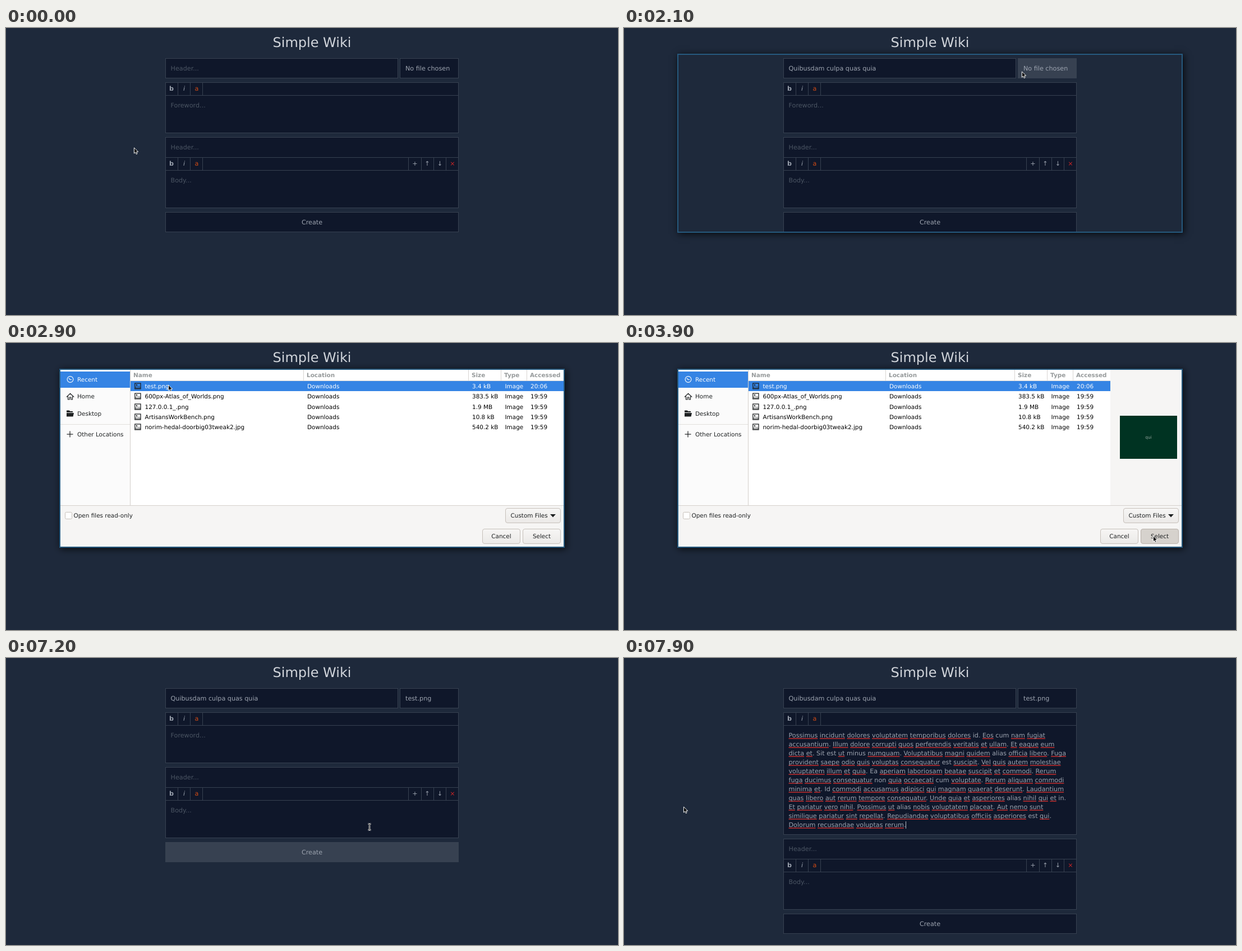
An HTML page with a canvas for the animation above (8 s loop, 1091 by 513 pixels).

```html
<!DOCTYPE html>
<html lang="en">
<head>
<meta charset="utf-8">
<title>Simple Wiki</title>
<style>
html, body { margin: 0; width: 100%; height: 100%; overflow: hidden; background: #1e293b; }
canvas { display: block; width: 1091px; height: 513px; }
</style>
</head>
<body>
<canvas id="stage"></canvas>
<script>
const W = 1091, H = 513, LOOP = 8000, STEP = 100;
const canvas = document.getElementById('stage');
const ratio = window.devicePixelRatio || 1;
canvas.width = W * ratio;
canvas.height = H * ratio;
const ctx = canvas.getContext('2d');
ctx.scale(ratio, ratio);
ctx.textRendering = 'geometricPrecision';

const FONT = '"DejaVu Sans", sans-serif';
const PAGE = '#1e293b', FIELD = '#0f172a', LINE = '#374151';
const TEXT = '#9ca3af', HINT = '#4b5563';
const INK = '#1e2122', EDGE = '#c6c0ba', PANEL = '#f6f5f4', BLUE = '#3584e4';
const WEB = 11.2, GTK = 10.45;
const LEFT = 284, RIGHT = 807, PAD = 293.5;
const GROWTH = 128;

const TITLE = 'Quibusdam culpa quas quia';
const FOREWORD = [
  'Possimus incidunt dolores voluptatem temporibus dolores id. Eos cum nam fugiat',
  'accusantium. Illum dolore corrupti quos perferendis veritatis et ullam. Et eaque eum',
  'dicta et. Sit est ut minus numquam. Voluptatibus magni quidem alias officia libero. Fuga',
  'provident saepe odio quis voluptas consequatur est suscipit. Vel quis autem molestiae',
  'voluptatem illum et quia. Ea aperiam laboriosam beatae suscipit et commodi. Rerum',
  'fuga ducimus consequatur non quia occaecati cum voluptate. Rerum aliquam commodi',
  'minima et. Id commodi accusamus adipisci qui magnam quaerat deserunt. Laudantium',
  'quas libero aut rerum tempore consequatur. Unde quia et asperiores alias nihil qui et in.',
  'Et pariatur vero nihil. Possimus ut alias nobis voluptatem placeat. Aut nemo sunt',
  'similique pariatur sint repellat. Repudiandae voluptatibus officiis asperiores est qui.',
  'Dolorum recusandae voluptas rerum.'
];
const KNOWN_WORDS = new Set(['id', 'cum', 'sit', 'est', 'minus', 'alias', 'ea', 'non', 'in']);

const FILES = [
  ['test.png', '3.4 kB', '20:06'],
  ['600px-Atlas_of_Worlds.png', '383.5 kB', '19:59'],
  ['127.0.0.1_.png', '1.9 MB', '19:59'],
  ['ArtisansWorkBench.png', '10.8 kB', '19:59'],
  ['norim-hedal-doorbig03tweak2.jpg', '540.2 kB', '19:59']
];

// Pointer path: time, x, y
const PATH = [
  [0, 229, 214], [100, 255, 174], [200, 255, 174], [300, 795, 269], [400, 610, 168],
  [500, 420, 87], [1200, 420, 87], [1900, 710, 78], [2100, 710, 78], [2200, 600, 88],
  [2700, 290, 75], [3100, 290, 75], [3800, 944, 345], [3900, 944, 345], [4000, 865, 333],
  [4100, 440, 312], [4200, 2, 302], [7100, 2, 302], [7200, 648, 302], [7300, 592, 210],
  [7400, 582, 175], [7800, 582, 175], [7900, 107, 266], [8000, 107, 266]
];

const within = (t, a, b) => t >= a && t < b;

function rect(x, y, w, h, color) {
  ctx.fillStyle = color;
  ctx.fillRect(x, y, w, h);
}

function text(str, x, y, color, size = GTK, style = '', align = 'left') {
  ctx.font = `${style} ${size}px ${FONT}`;
  ctx.textAlign = align;
  ctx.fillStyle = color;
  ctx.fillText(str, x, y);
}

function frame(x, y, r, b, fill = FIELD) {
  rect(x, y, r - x, b - y, LINE);
  rect(x + 1, y + 1, r - x - 2, b - y - 2, fill);
}

function shape(points, fill, stroke, width = 1) {
  ctx.beginPath();
  points.forEach(([x, y]) => ctx.lineTo(x, y));
  ctx.closePath();
  if (fill) { ctx.fillStyle = fill; ctx.fill(); }
  if (stroke) { ctx.strokeStyle = stroke; ctx.lineWidth = width; ctx.stroke(); }
}

function rounded(x, y, w, h, radius, fill, stroke) {
  ctx.beginPath();
  ctx.roundRect(x + .5, y + .5, w - 1, h - 1, radius);
  ctx.fillStyle = fill;
  ctx.fill();
  ctx.strokeStyle = stroke;
  ctx.lineWidth = 1;
  ctx.stroke();
}

function caret(x, baseline) {
  rect(Math.round(x), baseline - 10, 1, 13, '#b4bac4');
}

function textWidth(str, size) {
  ctx.font = `${size}px ${FONT}`;
  return ctx.measureText(str).width;
}

function toolbar(y) {
  rect(LEFT, y, RIGHT - LEFT, 1, LINE);
  rect(LEFT, y + 23, RIGHT - LEFT, 1, LINE);
  [306, 328, 350].forEach(x => rect(x, y, 1, 24, LINE));
  text('b', 295, y + 15, TEXT, WEB, 'bold', 'center');
  text('i', 317.5, y + 15, TEXT, WEB, 'italic', 'center');
  text('a', 340, y + 15, '#d04a14', WEB, '', 'center');
}

function spelledLine(line, baseline) {
  for (const match of line.matchAll(/[a-z]+/gi)) {
    if (KNOWN_WORDS.has(match[0].toLowerCase())) continue;
    const x = PAD + textWidth(line.slice(0, match.index), WEB);
    rect(x, baseline + 1.2, textWidth(match[0], WEB), 1.5, '#c62f2f');
  }
  text(line, PAD, baseline, TEXT, WEB);
}

function drawPage(t) {
  const filled = t >= 7900;
  const shift = filled ? GROWTH : 0;
  const titled = t >= 900;

  rect(0, 0, W, H, PAGE);
  text('Simple Wiki', 545.5, 34, '#d1d5db', 24, '', 'center');

  frame(LEFT, 54, 699, 90);
  text(titled ? TITLE : 'Header...', PAD, 76, titled ? TEXT : HINT, WEB);
  if (within(t, 500, 1900)) caret(titled ? PAD + textWidth(TITLE, WEB) : PAD, 76);

  frame(702, 54, RIGHT, 90, within(t, 1900, 4000) ? LINE : FIELD);
  text(t >= 4000 ? 'test.png' : 'No file chosen', 712, 76, TEXT, WEB);

  frame(LEFT, 97, RIGHT, 188 + shift);
  toolbar(97);
  if (filled) {
    FOREWORD.forEach((line, i) => spelledLine(line, 142 + i * 16));
    const last = FOREWORD.length - 1;
    caret(PAD - .5 + textWidth(FOREWORD[last], WEB), 142 + last * 16);
  } else {
    text('Foreword...', PAD, 142, HINT, WEB);
    if (t >= 7600) caret(PAD, 142);
  }

  ctx.save();
  ctx.translate(0, shift);
  frame(LEFT, 195, RIGHT, 322);
  text('Header...', PAD, 217, HINT, WEB);
  toolbar(231);
  [717, 740, 762, 784].forEach(x => rect(x, 231, 1, 24, LINE));
  [['+', 729], ['↑', 751], ['↓', 773.5]].forEach(([c, x]) => text(c, x, 246, TEXT, WEB, '', 'center'));
  text('×', 796, 246, '#d02525', WEB, '', 'center');
  text('Body...', PAD, 276, HINT, WEB);
  frame(LEFT, 329, RIGHT, 365, within(t, 7200, 7300) ? LINE : FIELD);
  text('Create', 545.5, 351, TEXT, WEB, '', 'center');
  ctx.restore();
}

function drawDialogFrame(open) {
  ctx.save();
  ctx.beginPath();
  ctx.rect(0, 0, W, H);
  ctx.rect(95, 46, 901, 320);
  ctx.clip('evenodd');
  ctx.shadowColor = 'rgba(0,0,0,.8)';
  ctx.shadowBlur = 12 * ratio;
  ctx.shadowOffsetX = ctx.shadowOffsetY = 2 * ratio;
  rect(95, 46, 901, 320, '#000');
  ctx.restore();
  if (open) rect(97, 48, 897, 316, PANEL);
  ctx.strokeStyle = '#265a7f';
  ctx.lineWidth = 2;
  ctx.strokeRect(96, 47, 899, 318);
}

function drawSidebar(t) {
  rect(97, 48, 124, 242, '#fbfbfb');
  rect(221, 48, 1, 242, '#d3cfcb');
  rect(97, 51, 124, 29, t < 2300 ? '#4990e6' : BLUE);
  rect(97, 145, 124, 1, '#e1dfdc');
  text('Recent', 127, 69, '#fff');
  text('Home', 127, 99, INK);
  text('Desktop', 127, 130, INK);
  text('Other Locations', 127, 167, INK);

  ctx.strokeStyle = '#fff';
  ctx.lineWidth = 1.1;
  ctx.beginPath();
  ctx.arc(114.5, 65, 5.4, 0, Math.PI * 2);
  ctx.moveTo(111.8, 63);
  ctx.lineTo(114.5, 65.5);
  ctx.lineTo(117, 65.5);
  ctx.stroke();

  shape([[108.5, 96], [114.5, 90.3], [120.5, 96], [118.5, 96], [118.5, 101], [115.8, 101],
    [115.8, 97], [113.2, 97], [113.2, 101], [110.5, 101], [110.5, 96]], null, INK, 1.2);
  shape([[108, 120.5], [113, 120.5], [114, 122], [119, 122], [119, 124], [108, 124]], INK);
  shape([[108, 125], [121, 125], [119.5, 131.5], [108, 131.5]], INK);
  rect(108.5, 162.5, 11, 1.2, INK);
  rect(113.4, 157.5, 1.2, 11, INK);
}

function imageIcon(y) {
  ctx.strokeStyle = INK;
  ctx.lineWidth = 1.3;
  ctx.strokeRect(229.8, y - 5, 10.2, 10);
  shape([[231, y + 3.5], [231, y + 2], [233.5, y], [235.5, y + 1.7], [237.3, y + .5], [239, y + 2.2], [239, y + 3.5]],
    null, INK, .8);
  rect(232, y - 3, 2, 2, INK);
}

function drawList(t) {
  const chosen = t >= 2900, preview = t >= 3000;
  const right = preview ? 867 : 994;
  const near = preview ? -64 : 0, far = preview ? -128 : 0;
  rect(222, 48, right - 222, 242, '#fff');
  rect(222, 67, right - 222, 1, '#dddbd8');
  [530 + near, 824 + far, 882 + far, 928 + far].forEach(x => rect(x, 48, 1, 19, '#d8d5d2'));
  [['Name', 227], ['Location', 536 + near], ['Size', 830 + far], ['Type', 888 + far], ['Accessed', 934 + far]]
    .forEach(([label, x]) => text(label, x, 61, '#969a9b', GTK, 'bold'));

  FILES.forEach(([name, size, time], i) => {
    const y = 77 + i * 18.35, base = Math.round(y + 3.8);
    const active = chosen && i === 0;
    const color = active ? '#fff' : '#000';
    if (active) rect(222, 68, right - 222, 18, BLUE);
    imageIcon(Math.round(y));
    [[name, 247.5], ['Downloads', 537 + near], [size, 831 + far], ['Image', 889.5 + far], [time, 935 + far]]
      .forEach(([cell, x]) => text(cell, x, base, color));
  });

  if (preview) {
    rect(884, 130, 102, 77, '#003322');
    text('qui', 935, 171, '#8fa39b', 7.5, '', 'center');
  }
}

function button(x, y, w, h, state) {
  const fill = ctx.createLinearGradient(0, y, 0, y + h);
  const [top, bottom] = { normal: ['#f7f6f5', '#ebe9e7'], off: ['#faf9f8', '#faf9f8'], down: ['#d6d2cd', '#d6d2cd'] }[state];
  fill.addColorStop(0, top);
  fill.addColorStop(1, bottom);
  rounded(x, y, w, h, 3.5, fill, state === 'down' ? '#b8b0a9' : EDGE);
}

function drawActions(t) {
  rect(97, 290, 897, 1, '#d5d0cc');
  rounded(105, 302, 13, 13, 2, '#fff', EDGE);
  text('Open files read-only', 120.5, 312, INK);

  button(890, 295, 99, 27, 'normal');
  text('Custom Files', 899.5, 312, INK);
  shape([[970, 306], [980, 306], [975, 311.5]], INK);

  button(849, 332, 68, 27, 'normal');
  text('Cancel', 883, 349, INK, GTK, '', 'center');
  const state = t < 2900 ? 'off' : t < 3900 ? 'normal' : 'down';
  button(921, 332, 68, 27, state);
  text('Select', 955, 349, state === 'off' ? '#929595' : INK, GTK, '', 'center');
}

function pointerAt(t) {
  const next = PATH.findIndex(p => p[0] > t);
  const [t0, x0, y0] = PATH[next - 1], [t1, x1, y1] = PATH[next];
  const k = (t - t0) / (t1 - t0), ease = k * k * (3 - 2 * k);
  return [x0 + (x1 - x0) * ease, y0 + (y1 - y0) * ease];
}

function overText(x, y, t) {
  if (within(t, 2100, 4000) || t >= 7900 || x < LEFT || x > RIGHT) return false;
  return (x < 699 && within(y, 54, 90)) || within(y, 121, 188) || within(y, 195, 231) || within(y, 255, 322);
}

function drawPointer(t) {
  if (within(t, 900, 1300) || within(t, 4300, 7200)) return;
  const [x, y] = pointerAt(t);
  ctx.save();
  ctx.translate(x, y);
  if (overText(x, y, t)) {
    ctx.beginPath();
    for (const s of [-1, 1]) {
      ctx.moveTo(-2.5, s * 5.3);
      ctx.lineTo(-1, s * 5.3);
      ctx.lineTo(0, s * 4.3);
      ctx.lineTo(1, s * 5.3);
      ctx.lineTo(2.5, s * 5.3);
    }
    ctx.moveTo(0, -4.5);
    ctx.lineTo(0, 4.5);
    for (const [color, width] of [['#fff', 2.6], ['#000', 1]]) {
      ctx.strokeStyle = color;
      ctx.lineWidth = width;
      ctx.stroke();
    }
  } else {
    shape([[-.6, 0], [-.6, 10.1], [1.7, 8], [3.3, 11.6], [5, 10.8], [3.5, 7.3], [6.7, 7.2]], '#000', '#fff', 1);
  }
  ctx.restore();
}

function draw(now) {
  const t = Math.floor((now % LOOP) / STEP) * STEP;
  drawPage(t);
  if (within(t, 2100, 4000)) {
    const open = t >= 2200;
    drawDialogFrame(open);
    if (open) {
      drawSidebar(t);
      drawList(t);
      drawActions(t);
    }
  }
  drawPointer(t);
}

const start = performance.now();
function tick() {
  draw(performance.now() - start);
  requestAnimationFrame(tick);
}
tick();
</script>
</body>
</html>
```
